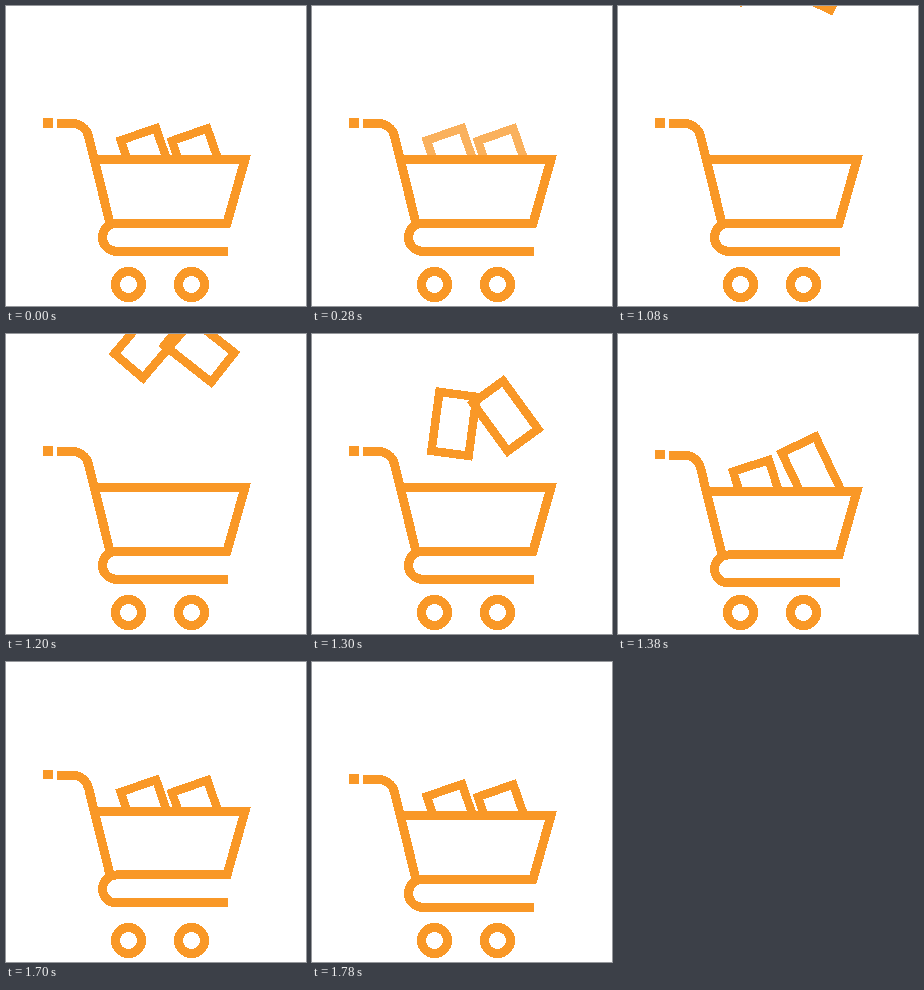
Animation, 300 px wide and 300 px high, one loop 2.13 s. Source, as an HTML page:

```html
<!DOCTYPE html>
<html lang="en">
<head>
<meta charset="utf-8">
<title>Shopping cart</title>
<style>
  html, body { margin: 0; width: 100%; height: 100%; overflow: hidden; background: #fff; }
  svg { display: block; width: 100%; height: 100%; }
</style>
</head>
<body>
<svg viewBox="0 0 300 300" fill="none" stroke="#f99827" stroke-width="9" shape-rendering="crispEdges">
  <clipPath id="above"><rect id="rim" y="-150" width="300" height="303"/></clipPath>
  <g id="boxes" clip-path="url(#above)" stroke-width="8.5">
    <rect class="box" x="-18.75" y="-29.75" width="37.5" height="59.5"/>
    <rect class="box" x="-18.75" y="-29.75" width="37.5" height="59.5"/>
  </g>
  <g id="cart">
    <rect x="37" y="112.2" width="10" height="9.5" fill="#f99827" stroke="none"/>
    <path d="M51 117.4H66C74 117.4 80.5 122.5 82.6 130.5L104 217.3"/>
    <path d="M88.5 153.45H239L221 217.3H110.5a14 14 0 0 0 0 28H222"/>
  </g>
  <circle cx="122.5" cy="278.5" r="13"/>
  <circle cx="185.5" cy="278.5" r="13"/>
</svg>
<script>
const LOOP = 2130, STEP = 40;
const FADE = 240, FADE_TIME = 160;
const DROP = 1080, HIT = 1300, REBOUND = 1574, SETTLE = 1780;
const BOUNCE = 4.6;

// fall and spin: start, speed and acceleration per ms
const boxes = [
  { x: 142, y: 156.5, angle: -18.8, fall: [-34.5, 0.33, 0.00107], spin: [63, -0.203, -0.00022] },
  { x: 193.4, y: 156.8, angle: -19.2, fall: [-25.7, 0.339, 0.000685], spin: [-65, 0.1317, 0] }
];

const $ = id => document.getElementById(id);
const rects = document.querySelectorAll('.box');

const snap = (t, from) => from + Math.floor((t - from) / STEP) * STEP;
const travel = ([p, v, a], s) => p + v * s + a * s * s;
const hump = (t, from, to) => t > from && t < to ? Math.sin(Math.PI * (t - from) / (to - from)) : 0;

function opacity(t) {
  if (t < FADE || t >= DROP) return 1;
  return Math.max(0, 1 - (snap(t, FADE) - FADE) / FADE_TIME);
}

function draw(time) {
  const t = time < DROP ? time : Math.max(DROP, snap(time, HIT));
  const dy = BOUNCE * (hump(t, HIT, REBOUND) - hump(t, REBOUND, SETTLE));
  $('cart').setAttribute('transform', `translate(0 ${dy})`);
  $('rim').setAttribute('height', 303 + dy);
  $('boxes').setAttribute('opacity', opacity(time));

  boxes.forEach((b, i) => {
    const s = t < DROP ? LOOP : t - DROP;
    const y = Math.min(b.y + dy, travel(b.fall, s));
    const limit = b.spin[0] > b.angle ? Math.max : Math.min;
    const angle = limit(b.angle, travel(b.spin, s));
    rects[i].setAttribute('transform', `translate(${b.x} ${y}) rotate(${angle})`);
  });
}

const start = performance.now();
function frame() {
  draw((performance.now() - start) % LOOP);
  requestAnimationFrame(frame);
}
frame();
</script>
</body>
</html>
```
